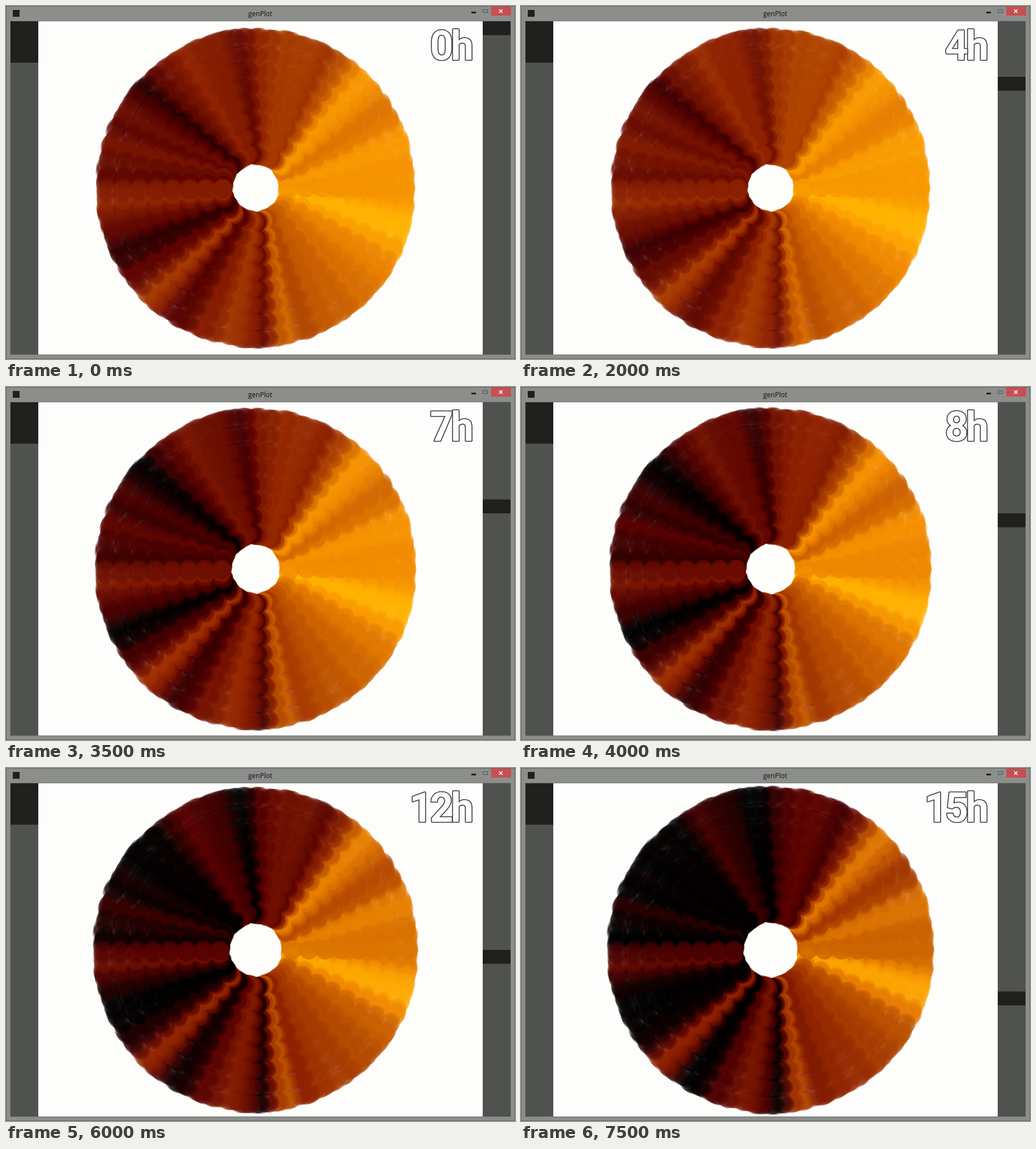
These frames come from a looping animation (899 px wide and 623 px high, 8000 ms). An HTML page with a canvas:

```html
<!DOCTYPE html>
<html lang="en">
<head>
<meta charset="utf-8">
<title>Hourly rings</title>
<style>
html, body { margin: 0; width: 100%; height: 100%; overflow: hidden; background: #8c8e8b; }
canvas { display: block; }
</style>
</head>
<body>
<canvas id="stage" width="899" height="623"></canvas>
<script>
const ctx = document.getElementById('stage').getContext('2d');
const HOUR = 500, HOURS = 16;
const CX = 441, CY = 321, RINGS = 8, GAP = 29.4, INNER = 59, DOT = 17;
const GROUPS = 60, PER_GROUP = 5, ALPHA = .31;

// Warm and cool streaks: angle in degrees, strength, width
const STREAKS = [
  [17, .2, 8], [80, .16, 4], [89, -.2, 4], [103, .09, 8], [122, -.08, 6],
  [135, .22, 5], [155, -.15, 6], [176, .15, 5],
  [-20, .06, 6], [-31, -.08, 5], [-47, .18, 6], [-63, -.13, 7],
  [-97, -.13, 6], [-118, .08, 10], [-139, -.17, 6], [-165, .06, 4]
];
const HEAT = [[0, 0, 0], [82, 0, 0], [140, 33, 0], [193, 87, 0], [243, 141, 0], [255, 178, 0]];

const rad = deg => deg * Math.PI / 180;
const clamp = x => Math.max(0, Math.min(1, x));

function noise(n) {
  const s = Math.sin(n * 127.1 + 11.7) * 43758.5453;
  return (s - Math.floor(s)) * 2 - 1;
}

// Slight warming until 4h, then cooling; the left side cools sooner
function cooling(hour, cos) {
  if (hour < 4) return -.035 * hour;
  return -.14 + 1.14 * ((hour - 4) / 11) ** (.8 + .2 * cos);
}

function heatAt(deg, hour) {
  const cos = Math.cos(rad(deg));
  const cool = cooling(hour, cos);
  const base = .25 + .58 * ((1 + cos) / 2) ** 1.6;
  const streak = STREAKS.reduce((sum, [at, gain, width]) =>
    sum + gain * Math.exp(-(((deg - at) / width) ** 2)), 0);
  const loss = .19 + .1 * Math.max(0, Math.cos(rad(deg + 120)));
  return clamp(base + streak * (1 + .5 * cool) - loss * cool);
}

function heatColor(heat) {
  const x = heat * (HEAT.length - 1);
  const i = Math.min(HEAT.length - 2, Math.floor(x));
  return HEAT[i].map((c, n) => Math.round(c + (HEAT[i + 1][n] - c) * (x - i)));
}

function box(x, y, w, h, color) {
  ctx.fillStyle = color;
  ctx.fillRect(x, y, w, h);
}

function spoke(deg, hour, heat, shift, alpha) {
  const a = rad(deg);
  ctx.fillStyle = `rgba(${heatColor(heat)},${alpha})`;
  for (let k = 0; k < RINGS; k++) {
    const r = INNER + k * GAP + shift;
    ctx.beginPath();
    ctx.arc(CX + r * Math.cos(a), CY + r * Math.sin(a), DOT, 0, Math.PI * 2);
    ctx.fill();
  }
}

// Both halves fan out from the right-hand axis, in loose bunches
function drawWheel(hour) {
  const drift = 7 * Math.max(0, cooling(hour, 0));
  for (const side of [-1, 1]) {
    for (let g = 0; g < GROUPS; g++) {
      const seed = g * side + 200;
      const mid = (g + .5 + noise(seed) * .3) * 180 / GROUPS;
      const heat = clamp(heatAt(mid * side, hour) + noise(seed + .3) * .03);
      for (let j = 0; j < PER_GROUP; j++) {
        const deg = mid + (j - (PER_GROUP - 1) / 2) * .5;
        const shift = drift + noise(seed + .6) * 2 + noise(seed * 9 + j);
        spoke(deg * side, hour, heat, shift, ALPHA);
      }
    }
  }
  spoke(0, hour, heatAt(0, hour), drift, .8);
}

function drawWindow() {
  box(0, 0, 899, 623, '#646663');
  box(1, 1, 897, 621, '#8c8e8b');
  box(7, 26, 885, 590, '#777976');
  box(8, 27, 883, 588, '#50524f');
  box(57, 27, 785, 588, '#fdfefc');
  box(8, 27, 49, 73, '#20201e');
  box(12, 7, 12, 12, '#20201e');
  box(822, 10, 8, 3, '#20201e');
  ctx.lineWidth = 1;
  ctx.strokeStyle = '#50524f';
  ctx.strokeRect(842.5, 6.5, 8, 5);
  box(857, 1, 35, 16, '#c84f51');
  ctx.lineWidth = 1.6;
  ctx.strokeStyle = '#fff';
  ctx.beginPath();
  ctx.moveTo(871, 6); ctx.lineTo(877, 12);
  ctx.moveTo(877, 6); ctx.lineTo(871, 12);
  ctx.stroke();
  ctx.font = '12px "Open Sans", sans-serif';
  ctx.textAlign = 'center';
  ctx.fillStyle = '#111';
  ctx.fillText('genPlot', 449, 18);
}

function drawLabel(hour) {
  ctx.font = 'bold condensed 72px Roboto, "Liberation Sans", sans-serif';
  ctx.textAlign = 'center';
  ctx.lineJoin = 'round';
  ctx.lineWidth = 3.2;
  ctx.strokeStyle = '#3a3a3a';
  ctx.fillStyle = '#fdfefc';
  [...(hour + 'h')].reverse().forEach((ch, i) => {
    const x = 806 - i * 36.5;
    ctx.strokeText(ch, x, 95);
    ctx.fillText(ch, x, 95);
  });
}

function draw(hour) {
  const row = 588 / 24;
  drawWindow();
  box(842, 27 + hour * row, 49, row, '#20201e');
  drawWheel(hour);
  drawLabel(hour);
}

let shown = -1;
function tick() {
  const hour = Math.floor(performance.now() / HOUR) % HOURS;
  if (hour !== shown) draw(shown = hour);
  requestAnimationFrame(tick);
}
tick();
</script>
</body>
</html>
```
